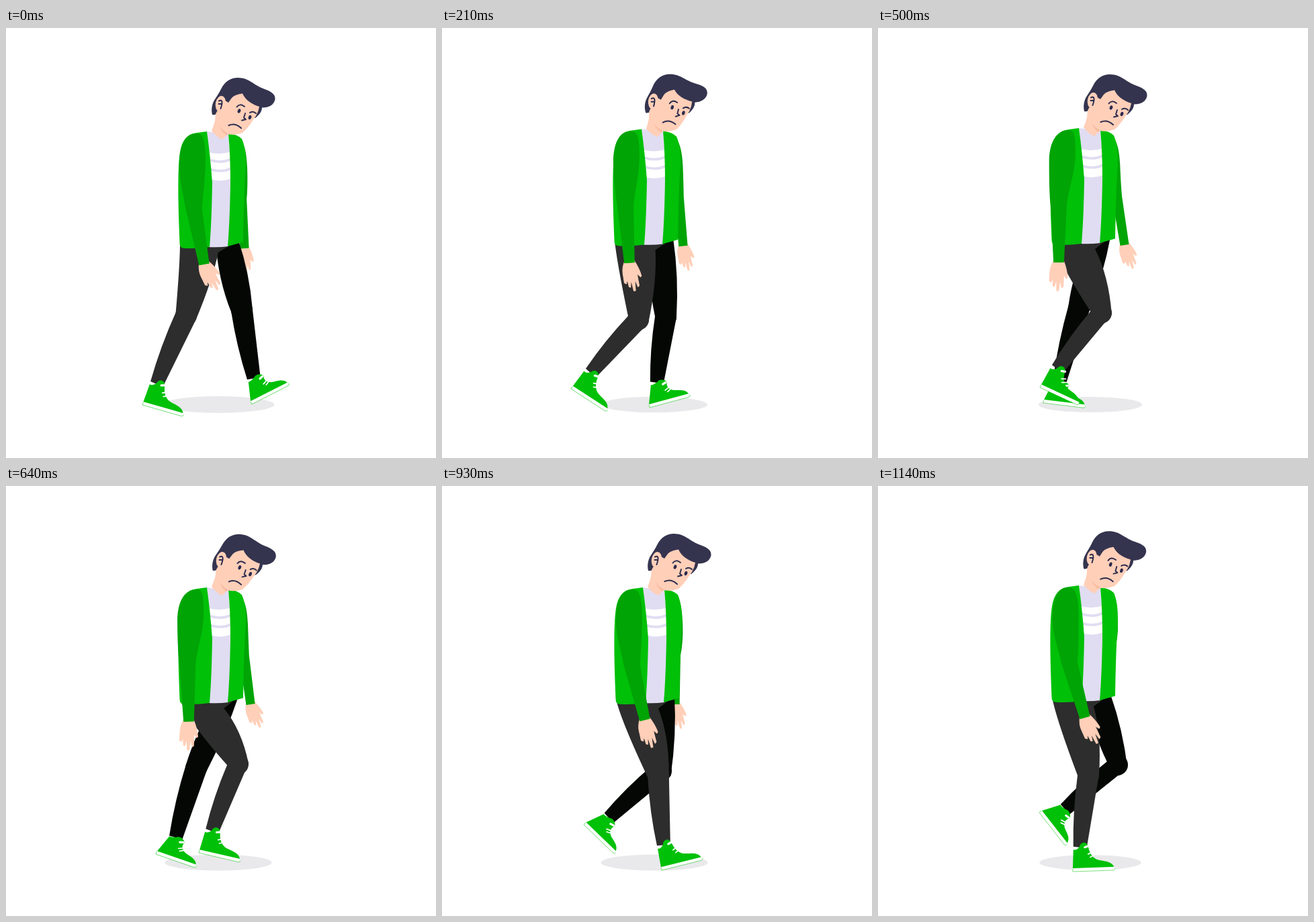
Write an HTML page with a canvas that moves like this. It is 640 px wide and 640 px high and loops after 1.21 s.

```html
<!DOCTYPE html>
<html lang="en">
<head>
<meta charset="utf-8">
<title>Sad walk</title>
<style>
  html, body { margin: 0; height: 100%; overflow: hidden; background: #fff; }
  canvas { display: block; }
</style>
</head>
<body>
<canvas id="stage" width="640" height="640"></canvas>
<script>
const ctx = document.getElementById('stage').getContext('2d');
const LOOP = 1210, CYCLE = 20;
const GREEN = '#00c008', SLEEVE = '#00a405', SKIN = '#ffcfb8', HAIR = '#34344f',
      SHIRT = '#e0ddf2', NEAR = '#2d2d2d', FAR = '#040704', INK = '#2b2b4d';

// Poses at these steps of the walk; the loop cuts before the cycle closes.
const steps = [0, 3, 5, 7, 9, 11, 13, 16];
// offset x, y, head tilt
const body = [[0, 0, 0], [-2, -3.5, -4], [-1.2, -6, -2.5], [0, -5, 0],
  [0, -3, 1.5], [0, 0, 3.5], [0, -3, 0], [0, -6, -1.5]];
// near cuff x, near hand angle, far cuff x, far hand angle
const arms = [[295, 26, 355, 2], [279, 9, 359, 11], [273, 1, 364, 14], [269, -4, 367, 18],
  [272, -3, 364, 21], [286, 3, 355, 19], [302, 13, 347, 12], [308, 24, 335, 5]];
// knee x, y, heel x, y, sole angle
const nearLeg = [[268, 428, 203, 561, 16], [292, 434, 192, 537, 33], [313, 430, 213, 528, 35],
  [332, 424, 241, 535, 25], [345, 414, 287, 546, 13], [337, 419, 352, 565, -18],
  [322, 431, 327, 572, -14], [313, 430, 290, 574, -2]];
const farLeg = [[351, 420, 366, 560, -27], [333, 430, 309, 565, -15], [316, 423, 277, 566, -4],
  [299, 417, 246, 558, 7], [283, 420, 223, 548, 19], [287, 423, 197, 530, 33],
  [326, 424, 211, 504, 44], [356, 415, 240, 486, 52]];

// Smooth cyclic curve through the rows of a track.
function pose(track, k) {
  const n = steps.length;
  const at = i => steps[(i + n) % n] + CYCLE * Math.floor(i / n);
  const row = i => track[(i + n) % n];
  let i = n - 1;
  while (steps[i] > k) i--;
  const h = at(i + 1) - at(i), t = (k - at(i)) / h;
  return row(i).map((a, c) => {
    const b = row(i + 1)[c];
    const ma = (b - row(i - 1)[c]) / (at(i + 1) - at(i - 1)) * h;
    const mb = (row(i + 2)[c] - a) / (at(i + 2) - at(i)) * h;
    const d = b - a;
    return a + t * (ma + t * (3 * d - 2 * ma - mb + t * (ma + mb - 2 * d)));
  });
}

const rad = deg => deg * Math.PI / 180;
const unit = (a, b) => {
  const x = b[0] - a[0], y = b[1] - a[1], l = Math.hypot(x, y);
  return [x / l, y / l];
};
const shift = (p, v, s) => [p[0] + v[0] * s, p[1] + v[1] * s];
const mid = (a, b, dx = 0, dy = 0) => [(a[0] + b[0]) / 2 + dx, (a[1] + b[1]) / 2 + dy];

function fill(color, path) {
  ctx.fillStyle = color;
  ctx.fill(new Path2D(path));
}
function line(color, width, path) {
  ctx.strokeStyle = color;
  ctx.lineWidth = width;
  ctx.stroke(new Path2D(path));
}
function oval(color, x, y, rx, ry, tilt = 0) {
  ctx.fillStyle = color;
  ctx.beginPath();
  ctx.ellipse(x, y, rx, ry, rad(tilt), 0, 7);
  ctx.fill();
}
function placed(x, y, deg, draw) {
  ctx.save();
  ctx.translate(x, y);
  ctx.rotate(rad(deg));
  draw();
  ctx.restore();
}

function hand(x, y, angle, size) {
  placed(x, y, -angle, () => {
    ctx.scale(size, size);
    const d = `M-7-3Q-12 6-12 14L-12 28-9.5 30-7 23-6 35-4 36-1.5 24 0 42 2.5 42
      4 24 7 37 9 35.5 8.5 17 13 23 14.5 21.5Q13 10 7-3Z`;
    fill(SKIN, d);
    ctx.lineJoin = 'round';
    line(SKIN, 1.2, d);
  });
}

// Cuff corners at the end of a forearm.
function cuff(elbow, wrist, half) {
  const [x, y] = unit(elbow, wrist), side = [y, -x];
  return [shift(wrist, side, -half), shift(wrist, side, half)];
}

function farArm(x, angle, [bx, by]) {
  const ex = 359 + .4 * (x - 357), ey = 255 + by, sx = 359 + .25 * (ex - 358) + bx / 2;
  const wrist = [x, 328 + by];
  const [l, r] = cuff([ex - 8, ey], wrist, 6.6);
  hand(...wrist, angle, .87);
  fill(SLEEVE, `M${346 + bx} ${164 + by}C${356 + bx} ${170 + by} ${sx - 1} ${188 + by} ${sx} ${208 + by}
    Q${sx + 1} ${235 + by} ${ex} ${ey}L${r} ${l} ${ex - 15} ${ey}Z`);
}

function nearArm(x, angle, [bx, by]) {
  const ex = 269 + .41 * (x - 269), ey = 270 + by, sx = 278 + .3 * (ex - 280) + bx / 2;
  const wrist = [x, 354 - .08 * (x - 269) + by];
  const [l, r] = cuff([ex, ey], wrist, 7.8);
  const top = `${284 + bx} ${157 + by}`;
  hand(...wrist, angle, 1);
  fill(SLEEVE, `M${top}C${268 + bx} ${156 + by} ${sx - 20} ${172 + by} ${sx - 20} ${204 + by}
    C${sx - 20} ${228 + by} ${ex - 14} ${ey - 15} ${ex - 12} ${ey}L${l} ${r} ${ex + 12} ${ey - 1}
    C${ex + 14} ${ey - 25} ${sx + 19} ${220 + by} ${sx + 19} ${194 + by}
    C${sx + 19} ${172 + by} ${294 + bx} ${156 + by} ${top}Z`);
}

// lean: how far the shoe's collar tips forward over the sole
function shoe(x, y, angle, lean) {
  const p = (px, py, dx, dy) => `${px + dx * lean} ${py + dy * lean} `;
  placed(x, y, angle, () => {
    fill(GREEN, `M0-4L${p(1, -33, 9.5, 1)}C${p(4, -31, 9.5, 0)}${p(8, -34, 10, 1)}${p(10, -37, 11, 3)}
      C${p(12, -45, 12, 8)}${p(20, -46, 12, 10)}${p(23, -38, 12, 8)}
      C${p(24, -30, 8, 4)}${p(28, -22, 6, 2)}${p(34, -18, 4, 0)}C42-13 58-16 62-4Z`);
    fill('#fff', 'M0-5L62-5Q64-2 61 0L0 0Z');
    line(GREEN, .5, 'M0-4L0 0L61 0Q63-1 63-3');
    ctx.lineCap = 'round';
    line('#fff', 3.2, `M${p(18, -36.5, 10, 8)}L${p(23, -38, 10, 8)}`);
    line('#fff', 1.7, `M${p(23, -26, 6, 7)}L${p(29, -28.5, 6, 7)}M${p(26, -21, 6, 5)}L${p(32, -24, 6, 5)}`);
  });
}

function leg(color, [kx, ky, hx, hy, angle], lean, back, backBend, front, frontBend) {
  const knee = [kx, ky], a = rad(angle), ax = 11 + 9 * lean, ay = -36 + 3 * lean;
  const ankle = [hx + ax * Math.cos(a) - ay * Math.sin(a), hy + ax * Math.sin(a) + ay * Math.cos(a)];
  const u = unit(mid(back, front), knee), v = unit(knee, ankle);
  const w = unit([0, 0], [u[0] + v[0], u[1] + v[1]]);
  const across = [w[1], -w[0]], shinAcross = [v[1], -v[0]];
  const kl = shift(knee, across, -16), kr = shift(knee, across, 16);
  const al = shift(ankle, shinAcross, -10), ar = shift(ankle, shinAcross, 10);
  const calf = shift(mid(kl, al), shinAcross, -4);
  fill(color, `M${back}Q${backBend(kl)} ${kl}Q${calf} ${al}L${ar} ${kr}Q${frontBend(kr)} ${front}Z`);
  oval(color, kx, ky, 16, 16);
  shoe(hx, hy, angle, lean);
}

function legs(near, far, [bx, by]) {
  const back = [312 + bx, 318 + by], front = [346 + bx, 316 + by];
  leg(FAR, far, 1, back, k => mid(back, k, -8, 4), front, k => mid(front, k, 6, -2));
  const hip = [259 + bx, 320 + by], crotch = [320 + .11 * (near[0] - 305) + bx / 2, 334 + by];
  fill(NEAR, `M${hip}L${front}L${crotch}L${290 + bx} ${340 + by}Z`);
  leg(NEAR, near, .1, hip, () => [259 + .12 * (near[0] - 268) + bx, 350 + by],
    crotch, k => mid(crotch, k, 8, -9));
}

function torso() {
  fill(SHIRT, 'M299 154L331 158L336 220L331 325Q316 327 301 326L306 235Z');
  fill('#fff', 'M302 185Q318 189 334 184.5L335 224Q320 230 305 225Z');
  ctx.lineCap = 'butt';
  line(SHIRT, 3.6, 'M302 196Q319 202.5 335 195M303 210Q320 216 335 209');
  fill(GREEN, `M299 154Q304 190 307 230Q306 290 303 326Q280 329 263 327.5Q258.5 327 258.5 320
    Q254 215 259 185Q263 158 284 156Z`);
  fill(GREEN, `M331 157Q334 190 334 230Q333 290 330 325L353 318.5Q354 250 357 205
    Q357 178 351 165Q344 158 331 157Z`);
}

function head() {
  fill(HAIR, `M307 129C305 120 307 112 311 106C314 101 317 97 320 91C326 79 335 74 345 74
    C362 74 368 85 385 91C396 95 401 99 400.5 106C399 115 390 119 381 118.5
    C381 125 376 130 371 134L330 128L315 127Q311 130 307 129Z`);
  fill(SKIN, `M312 128L311 138Q309 146 306 153Q314 163 322 166L330 158Q342 160 352 156
    Q361 148 367 138L372 131Q376 124 377 117Q358 111 352 97.5Q340 99 336 104L331 111L326 108L314 124Z`);
  fill('#f7bca0', 'M318 146Q323 154 331 157L328 160Q321 155 318 146Z');
  oval(SKIN, 319.3, 112.5, 7.4, 11.6, 12);
  ctx.lineCap = ctx.lineJoin = 'round';
  line(INK, 2, 'M317 108.5Q322 106 321.5 112Q321 116 319.5 120M316.5 113L321 113');
  line(INK, 2, 'M343.5 117.5Q348 111.5 355 117M363 126Q368 123 372 127');
  line(INK, 1.9, 'M356 127L354 133.5L357 136L351 137.5');
  line(INK, 2, 'M331.5 145Q341 140.5 350 149');
  oval(INK, 347, 123.5, 2.2, 3.3, 20);
  oval(INK, 363, 133, 2.2, 3.3, 20);
}

function draw(k) {
  const b = pose(body, k), [bx, by, tilt] = b;
  const [nearX, nearHand, farX, farHand] = pose(arms, k);
  ctx.fillStyle = '#fff';
  ctx.fillRect(0, 0, 640, 640);
  oval('#e9e9eb', 316, 560.5, 83.5 + 1.3 * by, 12.5 + .2 * by);
  farArm(farX, farHand, b);
  legs(pose(nearLeg, k), pose(farLeg, k), b);
  placed(bx, by, 0, torso);
  placed(318 + bx, 155 + by, tilt, () => {
    ctx.translate(-318, -155);
    head();
  });
  nearArm(nearX, nearHand, b);
}

// Steps last 70 ms, two of them 80 ms.
const stepStart = k => 70 * k + (k > 3 ? 10 : 0) + (k > 10 ? 10 : 0);
const began = performance.now();
function tick() {
  const t = (performance.now() - began) % LOOP;
  let k = 0;
  while (stepStart(k + 1) <= t) k++;
  draw(k);
  requestAnimationFrame(tick);
}
tick();
</script>
</body>
</html>
```
